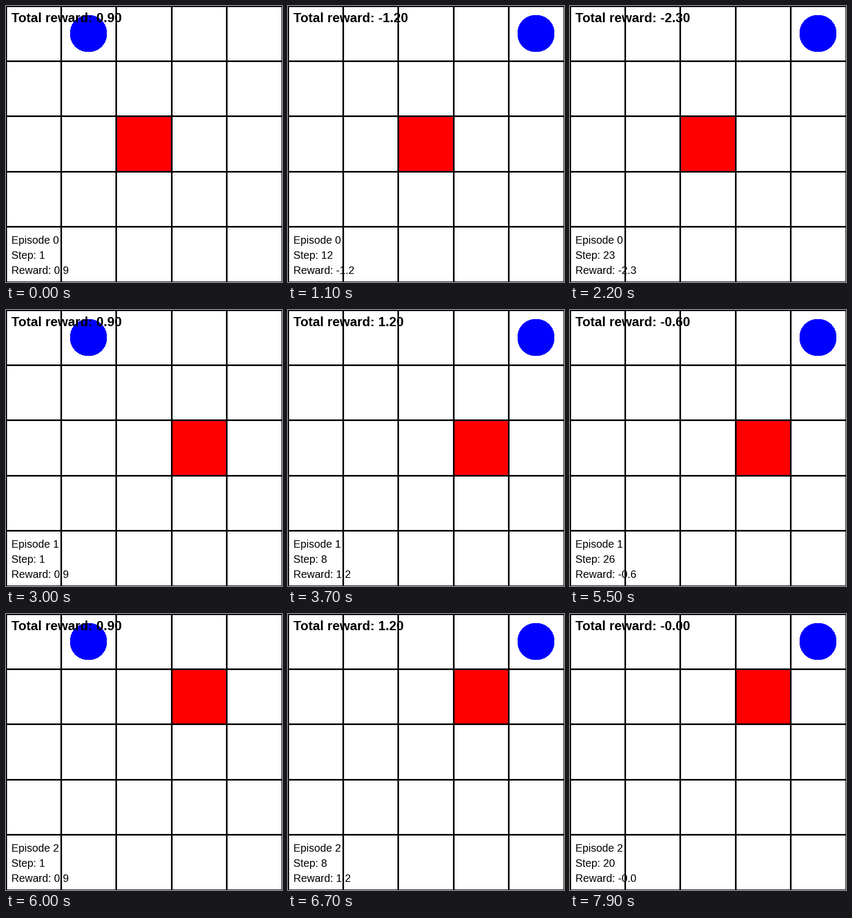
A matplotlib script that plays this animation: 512 px wide and 512 px high, repeating every 8 s.

```python
import matplotlib.pyplot as plt
from matplotlib.animation import FuncAnimation
from matplotlib.patches import Circle, Rectangle

SIZE, DPI = 512, 64
CELLS = 5
CELL = SIZE / CELLS
EPISODE_STEPS = 30
FRAMES, INTERVAL = 80, 100
GOALS = [(2, 2), (3, 2), (3, 1)]  # column, row for each episode

fig = plt.figure(figsize=(SIZE / DPI, SIZE / DPI), dpi=DPI, facecolor="white")
ax = fig.add_axes([0, 0, 1, 1])
ax.set_xlim(0, SIZE)
ax.set_ylim(SIZE, 0)
ax.axis("off")


def box(x, y, w, h, color, z):
    return ax.add_patch(Rectangle((x, y), w, h, facecolor=color, linewidth=0,
                                  antialiased=False, zorder=z))


def label(y, px, weight="normal"):
    return ax.text(10, y, "", fontsize=px * 72 / DPI, family="Liberation Sans",
                   weight=weight, color="black", va="baseline", zorder=4)


def column(step):
    """The agent keeps walking right until the wall stops it."""
    return min(step, CELLS - 1)


def total_reward(step, goal):
    """-0.1 per step, plus 1 for moving closer and minus 1 for moving away."""
    tenths = 0
    for s in range(1, step + 1):
        before = abs(column(s - 1) - goal[0])
        after = abs(column(s) - goal[0])
        tenths += 10 * (before - after) - 1
    return tenths / 10 - 1e-9  # accumulated rounding shows zero as -0.00


target = box(0, 0, CELL, CELL, "#ff0000", 1)
agent = ax.add_patch(Circle((0, 51), 34, facecolor="#0000ff", linewidth=0,
                            antialiased=False, zorder=2))
for i in range(CELLS + 1):
    p = int(i * CELL) - 1
    box(p, 0, 3, SIZE, "black", 3)
    box(0, p, SIZE, 3, "black", 3)

total_text = label(30, 24.3, "bold")
episode_text, step_text, reward_text = (label(y, 19.8) for y in (441, 469, 497))


def update(frame):
    episode, step = divmod(frame, EPISODE_STEPS)
    step += 1
    goal = GOALS[episode]
    total = total_reward(step, goal)

    target.set_xy([int(g * CELL) for g in goal])
    agent.center = (int((column(step) + 0.5) * CELL), 51)
    total_text.set_text(f"Total reward: {total:.2f}")
    episode_text.set_text(f"Episode {episode}")
    step_text.set_text(f"Step: {step}")
    reward_text.set_text(f"Reward: {total:.1f}")
    return target, agent, total_text, episode_text, step_text, reward_text


anim = FuncAnimation(fig, update, frames=FRAMES, interval=INTERVAL,
                     repeat=True, repeat_delay=0)
plt.show()
```
